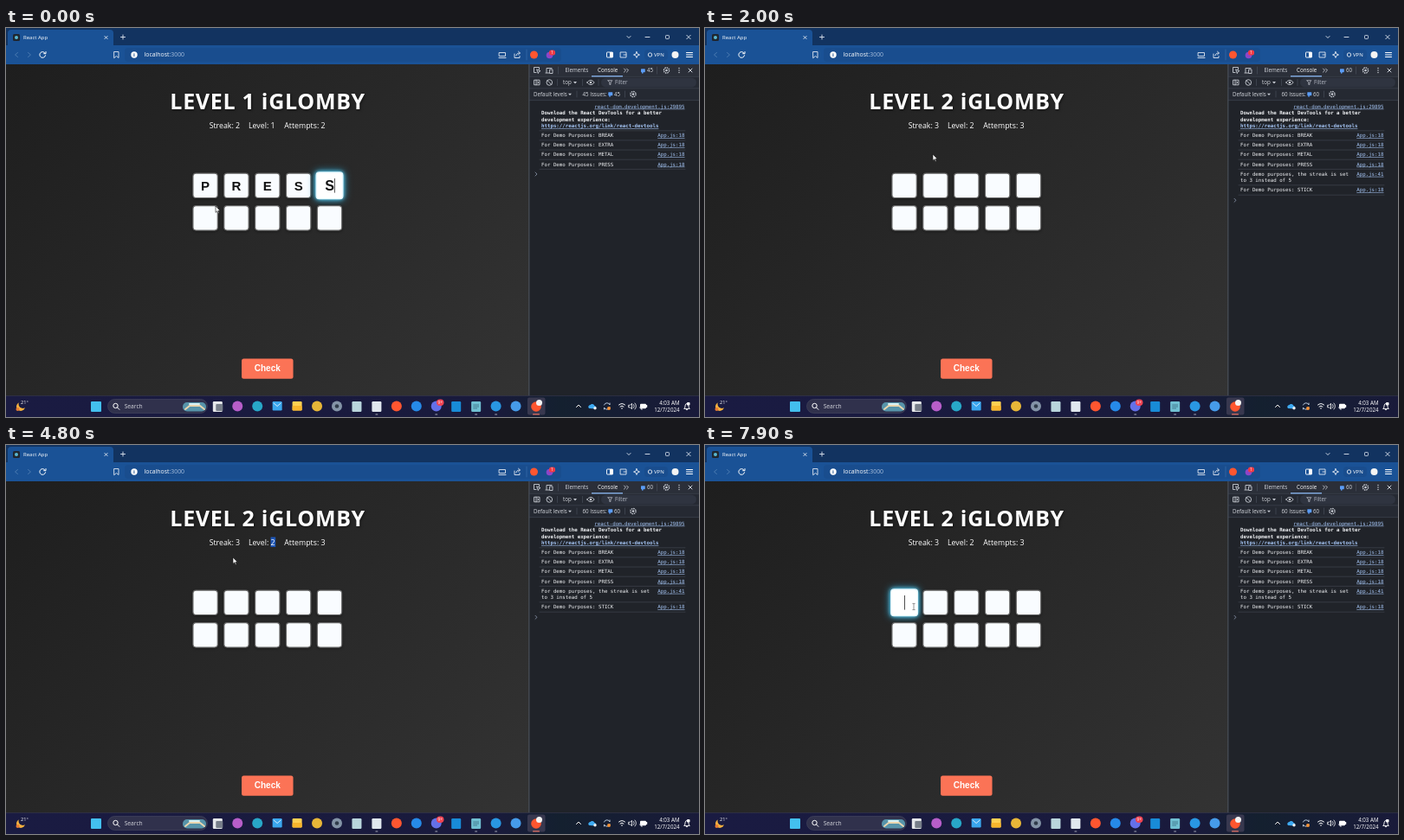
An HTML page that plays this animation: 800 px wide and 450 px high, repeating every 8000 ms.

```html
<!DOCTYPE html>
<html lang="en">
<head>
<meta charset="utf-8">
<title>Word game</title>
<style>
html, body { margin: 0; width: 100%; height: 100%; overflow: hidden; background: #202329; }
svg { display: block; width: 800px; height: 450px; background: linear-gradient(135deg, #1e1e1e, #333) 0 42px / 604px 384px no-repeat; }
text { font-family: "Open Sans", "Noto Sans", sans-serif; white-space: pre; }
.mono { font-family: "DejaVu Sans Mono", monospace; }
.arial { font-family: "Liberation Sans", Arial, sans-serif; font-weight: bold; }
.bold { font-weight: bold; }
.link { text-decoration: underline; }
.title { font-weight: bold; letter-spacing: .72px; filter: drop-shadow(1.5px 1.5px 1.5px #0008); }
.tile { filter: drop-shadow(0 1px 1.5px #0006); }
.glow { filter: drop-shadow(0 0 2px #6fd8f8) drop-shadow(0 0 4px #2c9cc4); }
</style>
</head>
<body>
<svg id="stage" viewBox="0 0 800 450">
  <defs>
    <linearGradient id="bar">
      <stop stop-color="#1a1b42"/><stop offset=".7" stop-color="#191a3c"/>
      <stop offset=".8" stop-color="#14202f"/><stop offset="1" stop-color="#191a3a"/>
    </linearGradient>
  </defs>
  <g id="frame"></g>
  <g id="page"></g>
  <g id="mouse">
    <path id="arrow" d="M0 0V7.4L1.8 5.8L3 8.4L4.1 7.9L2.9 5.4H5.2Z" fill="#fff" stroke="#111" stroke-width=".6"/>
    <path id="beam" d="M-1.6-3.6H1.6M0-3.6V3.6M-1.6 3.6H1.6" fill="none" stroke="#777" stroke-width=".8"/>
    <path id="hand" d="M-1-3Q0-4 .8-3V0L3.5 1V3.5L2.5 5.5H-1L-3 2.2L-2.3 1.3L-1 2.2Z" fill="#fff" stroke="#111" stroke-width=".7"/>
  </g>
</svg>
<script>
const $ = id => document.getElementById(id);
const LOOP = 8000, CHECKED = 800, NEXT = 1500, SELECT = 2900, FOCUS = 5600;

const rect = (x, y, w, h, fill, r = 0, more = '') =>
  `<rect x="${x}" y="${y}" width="${w}" height="${h}" rx="${r}" fill="${fill}" ${more}/>`;
const dot = (x, y, r, fill, more = '') => `<circle cx="${x}" cy="${y}" r="${r}" fill="${fill}" ${more}/>`;
const line = (d, color = '#dfe6f0', w = .9) =>
  `<path d="${d}" fill="none" stroke="${color}" stroke-width="${w}" stroke-linecap="round" stroke-linejoin="round"/>`;
const text = (x, y, s, size, fill = '#fff', cls = '', anchor = 'start') =>
  `<text x="${x}" y="${y}" font-size="${size}" fill="${fill}" class="${cls}" text-anchor="${anchor}">${s}</text>`;
const cross = (x, y, r, c) => line(`M${x - r} ${y - r}l${2 * r} ${2 * r}m0 ${-2 * r}l${-2 * r} ${2 * r}`, c);
const gear = (x, y, c = '#c7cbd3') =>
  dot(x, y, 3.1, 'none', `stroke="${c}" stroke-width="1.3" stroke-dasharray="1.6 .8"`) + dot(x, y, 1.3, c);
const caretDown = (x, y) => `<path d="M${x} ${y}h4l-2 2.4z" fill="#c7cbd3"/>`;

function browser() {
  return rect(0, 0, 800, 42, '#123360') + rect(2, 2, 122, 24, '#1a5296', 4) + rect(0, 20, 800, 22, '#1a5296') +
    rect(8, 7, 8, 8, '#20262e', 1.5) + dot(12, 11, 2, '#58b8d0') +
    text(20, 13.2, 'React App', 6) + cross(115.5, 11, 1.6) + line('M132.5 10.5h5m-2.5-2.5v5') +
    line('M717 9.5l2 2l2-2') + line('M738 10.5h5') + rect(761.5, 8.5, 4, 4, 'none', .8, 'stroke="#dfe6f0" stroke-width=".8"') + cross(788, 10.5, 2.2) +
    line('M13.5 28.5l-3 2.5l3 2.5', '#4f7eb4') + line('M25.5 28.5l3 2.5l-3 2.5', '#4f7eb4') +
    line('M45.2 29.2a3.4 3.4 0 1 0 .4 2.5M46 27.5v2.2h-2.3', '#fff', 1) +
    line('M125 27.5h5v7l-2.5-2l-2.5 2z') +
    rect(137, 23, 504, 16, '#194d8e', 4) + dot(148, 31, 3.7, '#fff') + text(148, 33.2, 'i', 6, '#194d8e', 'bold', 'middle') +
    `<text x="159.6" y="33.2" font-size="6.9" fill="#fff">localhost<tspan fill="#a8bfdd">:3000</tspan></text>` +
    line('M569.5 28.5h7v4h-7zM569 34.5h8') + line('M587 30v4.5h6v-2M589 32q0-3 4-3m-1.5-1.8l2 1.8l-2 1.8') +
    line('M601 25v12', '#477ab7', .5) + dot(609.5, 31, 4.5, '#ff5630') + dot(627.5, 31.5, 3.8, '#8d45c8') +
    rect(627, 25.5, 7, 6, '#f03b45', 2.5) + text(630.5, 30.4, '1', 5, '#fff', '', 'middle') +
    rect(693.5, 28, 7, 6, 'none', .6, 'stroke="#fff" stroke-width=".9"') + rect(697, 28, 3.5, 6, '#fff') +
    line('M709.5 28h6.5v6h-6.5zM713 31h3') + line('M728 27.5l1 2.5l2.5 1l-2.5 1l-1 2.5l-1-2.5l-2.5-1l2.5-1z') +
    rect(737, 25, 27, 12, '#194d8e', 4) + dot(743.5, 31, 2.2, 'none', 'stroke="#fff" stroke-width=".8"') + text(748, 33.2, 'VPN', 6) +
    dot(772.5, 31, 4, '#f4f4f4') + line('M785.5 28.5h7m-7 2.5h7m-7 2.5h7', '#fff', 1);
}

function devtools() {
  return rect(604, 42, 196, 384, '#202329') + rect(604, 42, 196, 14, '#2b2f39') + rect(604, 56, 196, 28, '#252932') + rect(603.5, 42, .8, 384, '#56606f') +
    line('M604 56.4h196M604 69.8h196M604 83.6h196', '#464c58', .5) +
    line('M615.5 48v-2.5h-6v6h2.5M613 48l4 1.7l-1.8.7l-.7 1.8z', '#c7cbd3') + line('M624 51.5v-5h6M623 52h4M628 48h3v4.5h-3z', '#c7cbd3') +
    line('M637.5 45v8', '#555c69', .5) + text(645.5, 51.3, 'Elements', 6.2, '#d6d9df') + text(683, 51.3, 'Console', 6.2) +
    rect(676, 55.2, 36, 1.2, '#8fc0ff') + line('M713.5 47l2 2l-2 2m3-4l2 2l-2 2', '#c7cbd3') +
    rect(733, 47.2, 4.8, 4, '#5b9cf5', .6) + rect(734, 50, 1.5, 2.6, '#5b9cf5') +
    line('M751.5 45v8', '#555c69', .5) + gear(762.5, 49) + dot(777, 46.5, .7, '#d6d9df') + dot(777, 49, .7, '#d6d9df') + dot(777, 51.5, .7, '#d6d9df') + cross(790, 49, 2) +
    line('M610 60.2h6v5.6h-6zM612 60.2v5.6M613.5 62l1.5 1l-1.5 1', '#c7cbd3') + dot(627.3, 63, 3.3, 'none', 'stroke="#c7cbd3" stroke-width=".9"') + line('M625.1 60.8l4.4 4.4', '#c7cbd3') +
    line('M636.5 59.5v7M665.5 59.5v7M684 59.5v7', '#555c69', .5) +
    text(643, 65.2, 'top', 6.2, '#d6d9df') + caretDown(655, 62) +
    line('M670.8 63q4.2-5.4 8.4 0q-4.2 5.4-8.4 0z', '#c7cbd3') + dot(675, 63, 1.3, '#c7cbd3') +
    rect(687, 57.8, 110, 10.6, '#2f3440', 5.3) + line('M695 60.7h4.8l-1.8 2.4v2.3h-1.2v-2.3z', '#c7cbd3', .7) + text(703, 65.3, 'Filter', 6.2, '#b4b9c3') +
    text(609, 78.8, 'Default levels', 6.2, '#d6d9df') + caretDown(649, 75.7) + line('M659 73v7M714.5 73v7', '#555c69', .5) +
    gear(724, 76.6);
}

function taskbar() {
  const icons = ['#e5e7ea', '#b75ec9', '#28a7c8', '#3aa6ee', '#ffd052', '#e7b638', '#8494a7', '#b9d5dc', '#e0e7ee',
    '#ff5630', '#268ae8', '#6470e8', '#188bd7', '#70bfd2', '#2997e2', '#469be9'];
  let s = rect(0, 425.5, 800, 24.5, 'url(#bar)') + rect(0, 425.2, 800, .6, '#36374f') +
    dot(17, 438, 5, '#f5b13e') + dot(19.5, 435, 5, '#1a1b42') + dot(13.5, 441, 2, '#e77b35') + text(17, 435.2, '21°', 5.6, '#fff') +
    rect(98, 432, 12, 12, '#43bfee', 1) + rect(117.5, 429.5, 115, 16, '#30314c', 8, 'stroke="#484a62" stroke-width=".6"') +
    dot(126.5, 437, 2.7, 'none', 'stroke="#fff" stroke-width="1"') + line('M128.5 439l2.4 2.4', '#fff', 1) + text(136.7, 440, 'Search', 6.7, '#d5d6dd') +
    rect(204, 433, 27, 10.5, '#5794aa', 5) + line('M207 441l5-4h12l5 4', '#e8d5af', 2) + line('M212 435h11', '#d9f1f5', 2);
  icons.forEach((c, i) => {
    const x = 244.3 + i * 22.95;
    if ([0, 3, 4, 7, 8, 12, 13].includes(i)) {
      s += rect(x - 5.5, 432, 11, i == 3 || i == 4 ? 10.5 : 12, c, 1.2);
      if (i == 0) s += rect(x - 2, 435, 8, 8, '#777e89', 1);
      if (i == 3) s += line(`M${x - 4} 434l4 3.5l4-3.5`, '#eaf7ff');
      if (i == 4) s += rect(x - 5.5, 437, 11, 5.5, '#f7b52c', 1);
      if (i == 13) s += line(`M${x - 3} 436h6m-6 2h6m-6 2h4`, '#325f76', .7);
    } else s += dot(x, 437.5, 6, c);
    if (i == 6) s += dot(x, 437.5, 2.3, '#303b49');
    if ([8, 11, 13, 14].includes(i)) s += rect(x - 1.5, 446.5, 3, 1, '#a3a6b5', .5);
  });
  s += rect(497, 429.5, 8.5, 7.5, '#ef4453', 3.7) + text(501.2, 435.1, '9+', 4.7, '#fff', '', 'middle') +
    rect(602, 427.5, 20.5, 20, '#38384f', 2) + dot(612, 438, 5.8, '#ff5630') + dot(615.5, 433.5, 3.5, '#f4f4f4') + rect(608, 446.3, 8, 1.2, '#e87365', .6) +
    line('M658.5 438.5l2.5-2.5l2.5 2.5', '#fff', 1) + `<path d="M673 440a2.3 2.3 0 0 1 1.5-4a3 3 0 0 1 5 1a2 2 0 0 1 1 3.5z" fill="#3eaaf2"/>` + dot(680, 439.8, 1.7, '#eee') +
    line('M690.5 436a3.5 3.5 0 0 1 6.5 0v-2M697 439a3.5 3.5 0 0 1-6.5 0v2', '#b9c9dd', 1) + dot(696, 440, 2, '#f49237') +
    line('M707.5 436q3.5-3 7 0M709 438q2-1.8 4 0', '#fff', 1) + dot(711, 440, .8, '#fff') +
    line('M719 436.3h1.5l2-2v6.5l-2-2H719zM724.5 435.5q1.5 2 0 4M726 434q3 3.5 0 7', '#fff', .8) +
    rect(732, 434.7, 7, 5.6, '#fff', 1) + rect(739, 436, 1.2, 3, '#fff') + line('M732 439l2 2', '#d5d8e0', 1.5) +
    text(777.5, 435.5, '4:03 AM', 6.2, '#fff', '', 'end') + text(777.5, 444.4, '12/7/2024', 6.2, '#fff', '', 'end') +
    line('M783 440.2q1.3-1 1-3.2q.3-2.5 2-2.5t2 2.5q-.3 2.2 1 3.2zM785.3 441.6h1.4', '#fff', .9) + rect(786, 433, 3.5, 3.5, '#fff', 1);
  return s;
}

const mono = (x, y, s, fill = '#f0f2f5', cls = '', anchor) => text(x, y - .4, s, 5.78, fill, 'mono ' + cls, anchor);
const link = (y, s) => mono(783.5, y, s, '#a5c5f5', 'link', 'end');
const rule = y => line(`M616 ${y}h168`, '#4a505d', .5);

function consoleLog(level2) {
  let s = link(93, 'react-dom.development.js:29895') +
    mono(618, 100.8, 'Download the React DevTools for a better', '#f0f2f5', 'bold') +
    mono(618, 108.2, 'development experience:', '#f0f2f5', 'bold') +
    mono(618, 115.6, 'https://reactjs.org/link/react-devtools', '#a5c5f5', 'bold link') + rule(118.8);
  const word = (y, w) => mono(618, y, 'For Demo Purposes: ' + w) + link(y, 'App.js:18') + rule(y + 3.4);
  ['BREAK', 'EXTRA', 'METAL', 'PRESS'].forEach((w, i) => s += word(126.5 + i * 11.15, w));
  if (level2) s += mono(618, 171.2, 'For demo purposes, the streak is set') + link(171.2, 'App.js:41') +
    mono(618, 178.4, 'to 3 instead of 5') + rule(181.8) + word(189.8, 'STICK');
  const y = level2 ? 199.3 : 169;
  return s + line(`M611 ${y - 2}l2 2l-2 2`, '#8f9ab0', .8);
}

function tile(col, row, { letter = '', green, focus, caret }) {
  const x = 230.1 + col * 35.85, y = 182.3 + row * 37.6, h = focus ? 15.4 : 14.2;
  let s = rect(x - h, y - h, 2 * h, 2 * h, green ? '#179207' : focus ? '#fff' : '#f9fcff', 3.5,
    `class="${focus ? 'glow' : 'tile'}" stroke="${focus ? '#e4f8ff' : green ? '#4f554f' : '#666'}" stroke-width="1.2"`);
  if (letter) s += text(x, y + 5.3, letter, focus ? 16 : 15, '#111', 'arial', 'middle');
  if (caret) s += rect(x + (letter ? 5.4 : 0), y - 8.3, .8, 16.6, '#222');
  return s;
}

function page(t) {
  const checked = t >= CHECKED && t < NEXT, level2 = t >= NEXT, focused = t >= FOCUS;
  const level = level2 ? 2 : 1, score = level2 ? 3 : 2, issues = level2 ? 60 : checked ? 50 : 45;
  const blink = (focused ? t - FOCUS : t) % 1060 < 530;
  const selected = t >= SELECT && !focused;
  let s = text(189.3, 94, `LEVEL ${level} iGLOMBY`, 25, '#fff', 'title') +
    (selected ? rect(305.5, 106.5, 5.7, 11.5, '#1d55b5') : '') +
    text(234.7, 115.8, `Streak: ${score}`, 8.8) + text(280, 115.8, `Level: ${level}`, 8.8) + text(321.3, 115.8, `Attempts: ${score}`, 8.8);
  const active = level2 ? (focused ? 0 : -1) : checked ? -1 : 4;
  for (let row = 0; row < (checked ? 3 : 2); row++)
    for (let col = 0; col < 5; col++) {
      const focus = row == 0 && col == active;
      s += tile(col, row, { letter: row || level2 ? '' : 'PRESS'[col], green: checked && !row, focus, caret: focus && blink });
    }
  const hover = mouseAt(t).kind == 'hand';
  const [label, w] = checked ? ['Next Word', 78] : ['Check', 59.5];
  s += rect(301.8 - w / 2, 382.6, w, 23.2, hover ? '#f65735' : '#fb7356', 2.5) +
    text(301.8, 397.3, label, 10, '#fff', 'arial', 'middle');
  return s + consoleLog(level2) + text(740, 51.3, issues, 6.2, '#d6d9df') +
    text(665.5, 78.8, issues + ' Issues:', 6.2, '#d6d9df') + rect(695.3, 74.2, 5, 4, '#5b9cf5', .6) + rect(696.3, 77, 1.5, 2.6, '#5b9cf5') +
    text(702, 78.8, issues, 6.2, '#d6d9df');
}

// Pointer stops: time, x, y
const path = [[0, 242, 206], [200, 242, 206], [700, 304, 394], [1200, 317, 400], [1500, 317, 400], [2000, 263, 146],
  [2300, 268, 114], [2700, 312, 113], [3100, 306, 113], [3800, 291, 87], [4200, 280, 88], [4800, 262, 130],
  [5500, 232, 184], [5650, 232, 184], [5800, 261, 189], [6500, 690, 187], [7000, 690, 187], [7900, 241, 187], [8000, 241, 187]];

function mouseAt(t) {
  const i = path.findIndex(p => p[0] > t), [t0, x0, y0] = path[i - 1], [t1, x1, y1] = path[i];
  const u = (t - t0) / (t1 - t0), e = u * u * (3 - 2 * u);
  const x = x0 + (x1 - x0) * e, y = y0 + (y1 - y0) * e;
  const inside = (l, top, r, b) => x > l && x < r && y > top && y < b;
  const kind = inside(263, 382, 341, 406) ? 'hand'
    : inside(189, 74, 414, 118) || inside(214, 166, 389, 199) ? 'beam' : 'arrow';
  return { x, y, kind };
}

$('frame').innerHTML = browser() + devtools() + taskbar();
const start = performance.now();
let shown = '';
function draw() {
  const t = (performance.now() - start) % LOOP, m = mouseAt(t), html = page(t);
  if (html !== shown) $('page').innerHTML = shown = html;
  $('mouse').setAttribute('transform', `translate(${m.x} ${m.y})`);
  for (const k of ['arrow', 'beam', 'hand']) $(k).style.display = k == m.kind ? '' : 'none';
  requestAnimationFrame(draw);
}
draw();
</script>
</body>
</html>
```
